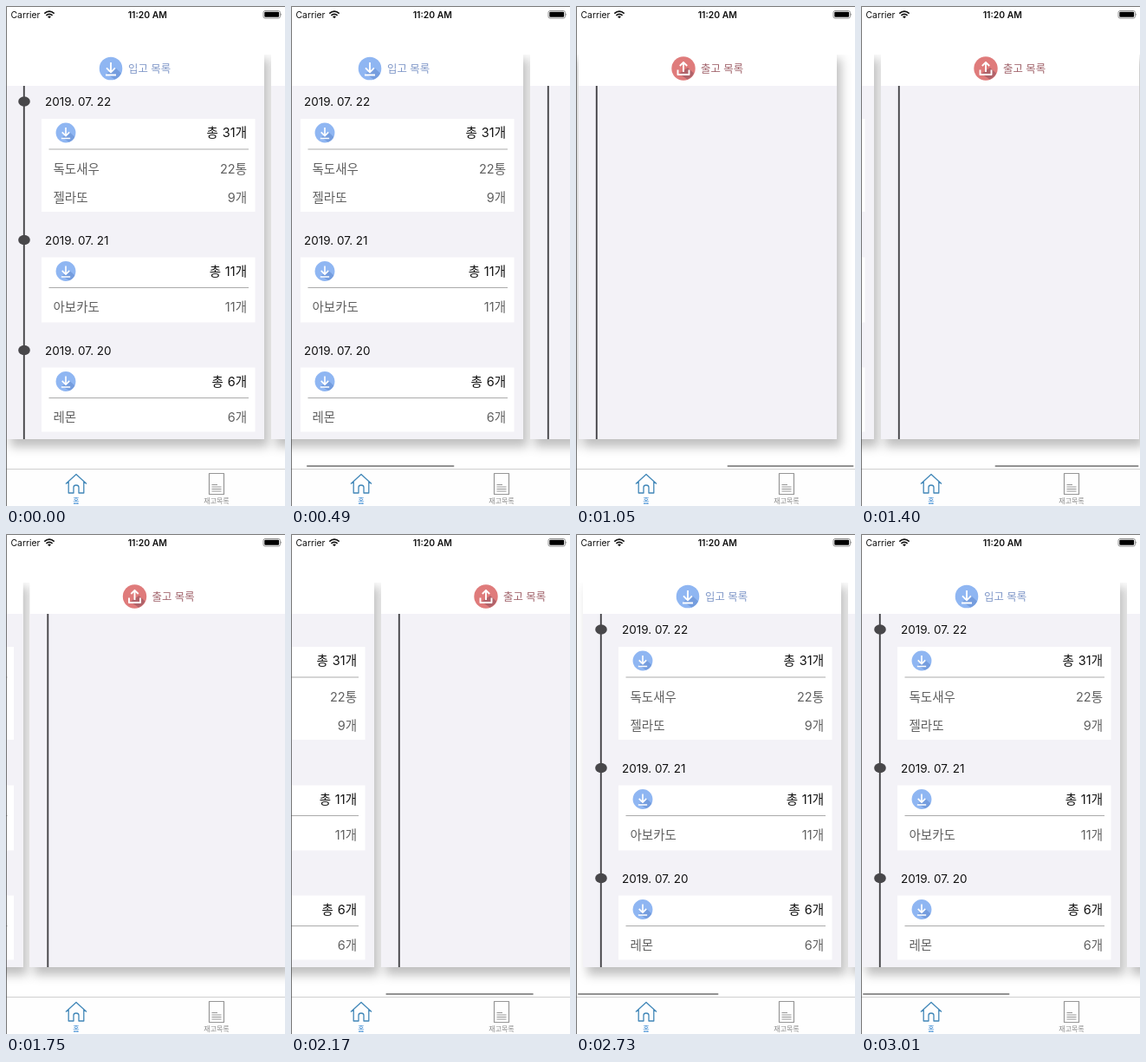
Animation of 322x576 px, one loop 3.08 s. Source, as an HTML page:

```html
<!DOCTYPE html>
<html lang="ko">
<head>
<meta charset="utf-8">
<style>
  html, body { margin: 0; width: 100%; height: 100%; overflow: hidden; background: #fff; }
  svg { display: block; width: 322px; height: 576px; }
  text { font-family: Inter, "Noto Sans CJK KR", "Noto Sans CJK", sans-serif; font-size: 14.5px; }
  .end { text-anchor: end; }
  .mid { text-anchor: middle; }
  .date { font-size: 13.5px; fill: #111; }
  .total { fill: #111; font-weight: 300; word-spacing: .8px; }
  .row { fill: #606060; font-weight: 300; }
  .title { font-size: 12.4px; font-weight: 300; }
  .tab { font-size: 8px; }
  .status { font-size: 10.4px; fill: #111; }
  .stroke { fill: none; stroke-linejoin: round; }
</style>
</head>
<body>
<svg viewBox="0 0 322 576">
  <defs>
    <clipPath id="view"><rect y="56" width="322" height="477"/></clipPath>
    <filter id="shadow" x="-10%" y="-10%" width="120%" height="120%">
      <feDropShadow dx="5" dy="9" stdDeviation="6" flood-color="#000" flood-opacity=".25"/>
    </filter>
    <path id="cast" d="M5-1L12 5.6A13.3 13.3 0 0 1 4.5 12.5L-5 6Z"/>
    <g id="in">
      <circle r="13.3" fill="#8fb6f2"/>
      <use href="#cast" fill="#759dde"/>
      <path class="stroke" d="M0-7V4M-5-.7L0 4.3L5-.7M-6 7.5H6" stroke="#fff" stroke-width="1.9"/>
    </g>
    <g id="out">
      <circle r="13.7" fill="#df7b7b"/>
      <use href="#cast" fill="#b0636a"/>
      <path class="stroke" d="M0 4V-7M-4.2-3L0-7.2L4.2-3M-6.5 1.5V7H6.5V1.5" stroke="#fff" stroke-width="1.9"/>
    </g>
    <g id="card">
      <rect y="52" width="298" height="447" fill="#fff" filter="url(#shadow)"/>
      <rect y="92" width="298" height="407" fill="#f3f2f7"/>
      <path d="M20.8 92V499" stroke="#454448" stroke-width="1.9"/>
    </g>
  </defs>

  <rect width="322" height="576" fill="#fff"/>
  <g clip-path="url(#view)">
    <g id="pages">
      <g>
        <use href="#card"/>
        <use href="#in" x="121" y="72"/>
        <text class="title" x="141" y="76.7" fill="#7f97c8">입고 목록</text>
        <g id="days"></g>
      </g>
      <g transform="translate(306)">
        <use href="#card"/>
        <use href="#out" x="121" y="72"/>
        <text class="title" x="141" y="76.7" fill="#a0626a">출고 목록</text>
      </g>
    </g>
    <rect id="bar" y="529" height="2" rx="1" fill="#929292"/>
  </g>

  <text class="status" x="5.5" y="13.7">Carrier</text>
  <g class="stroke" stroke="#111" stroke-width="1.7">
    <path d="M44.3 8.6Q50 3.6 55.7 8.6M46.4 10.8Q50 7.8 53.6 10.8"/>
  </g>
  <path d="M48 12.2Q50 10.8 52 12.2L50 14.3Z" fill="#111"/>
  <text class="status mid" x="163.3" y="13.7" font-weight="600">11:20 AM</text>
  <rect x="297" y="5.5" width="19.4" height="8.6" rx="2" fill="none" stroke="#777" stroke-width=".8"/>
  <rect x="298.3" y="6.8" width="16.8" height="6" rx="1" fill="#000"/>
  <path d="M317.4 8.3Q319 9.8 317.4 11.3Z" fill="#777"/>

  <rect y="533" width="322" height="43" fill="#fefefe"/>
  <path d="M0 533.5H322" stroke="#cfcfcf"/>
  <path class="stroke" d="M69 550.5L81 539.5L93 550.5M72.2 548V561H78V554.5Q78 552 81 552T84 554.5V561H89.8V548" stroke="#4187b8" stroke-width="1.3"/>
  <text class="tab mid" x="81" y="572.6" fill="#287fce" font-weight="500">홈</text>
  <path class="stroke" d="M234.5 538.5H251.5V562.5H234.5ZM237.5 551.5H244M237.5 554H248.5M237.5 556.5H248.5M237.5 559H248.5" stroke="#969696" stroke-width="1.2"/>
  <text class="tab mid" x="243" y="572.6" fill="#8c8c8c">재고목록</text>
  <path d="M.5 576V.5H322" fill="none" stroke="#555" stroke-width=".8"/>
</svg>
<script>
  const $ = id => document.getElementById(id);
  const days = [
    { y: 110, date: '2019. 07. 22', total: 31, height: 107, rows: [['독도새우', '22통'], ['젤라또', '9개']] },
    { y: 269.5, date: '2019. 07. 21', total: 11, height: 75, rows: [['아보카도', '11개']] },
    { y: 396.5, date: '2019. 07. 20', total: 6, height: 74, rows: [['레몬', '6개']] }
  ];

  // Digits are set a little heavier than the light Hangul around them.
  const withDigits = text => text.replace(/\d+/g, '<tspan font-weight="400">$&</tspan>');

  $('days').innerHTML = days.map(({ y, date, total, height, rows }) => `
    <g transform="translate(0 ${y})">
      <ellipse cx="21" rx="6.8" ry="5.8" fill="#48474a"/>
      <text class="date" x="45" y="5">${date}</text>
      <rect x="41" y="20" width="246.5" height="${height}" fill="#fff"/>
      <use href="#in" transform="translate(69 36) scale(.86)"/>
      <text class="total end" x="278" y="41.3">${withDigits(`총 ${total}개`)}</text>
      <path d="M49.5 55H280" stroke="#ababab"/>
      ${rows.map(([name, count], i) => `
        <text class="row" x="54.5" y="${82.7 + i * 33}">${name}</text>
        <text class="row end" x="278" y="${82.7 + i * 33}">${withDigits(count)}</text>`).join('')}
    </g>`).join('');

  const STEP = 70, STEPS = 44, MAX = 278.5, BAR = 170.5;

  // Scroll offset per step: a list of values following each starting step.
  const swipes = [
    [7, [30, 30, 100, 180, 240, 278, 297, 306, 303, 294.5, 289, 289, 285.5, 283, 280.5, MAX]],
    [31, [202, 110, 30, -14, -23.8, -22, -17, -12, -8, -5.5, -3.5, -2, -1]]
  ];

  function scrollAt(step) {
    const swipe = swipes.filter(([start]) => start <= step).pop();
    if (!swipe) return 0;
    const [start, offsets] = swipe;
    return offsets[Math.min(step - start, offsets.length - 1)];
  }

  function barOpacity(step) {
    if (step < 7 || (step >= 25 && step < 31)) return 0;
    return step === 24 ? 0.5 : 1;
  }

  function draw(now) {
    const step = Math.floor(now / STEP) % STEPS;
    const offset = scrollAt(step);
    const inside = Math.max(0, Math.min(MAX, offset));
    const squeeze = Math.abs(offset - inside);
    const left = 2 + inside / MAX * (318.5 - BAR) + Math.max(0, offset - MAX);
    $('pages').setAttribute('transform', `translate(${-offset})`);
    $('bar').setAttribute('x', left);
    $('bar').setAttribute('width', BAR - squeeze);
    $('bar').setAttribute('opacity', barOpacity(step));
  }

  const origin = performance.now();
  function tick() {
    draw(performance.now() - origin);
    requestAnimationFrame(tick);
  }
  tick();
</script>
</body>
</html>
```
